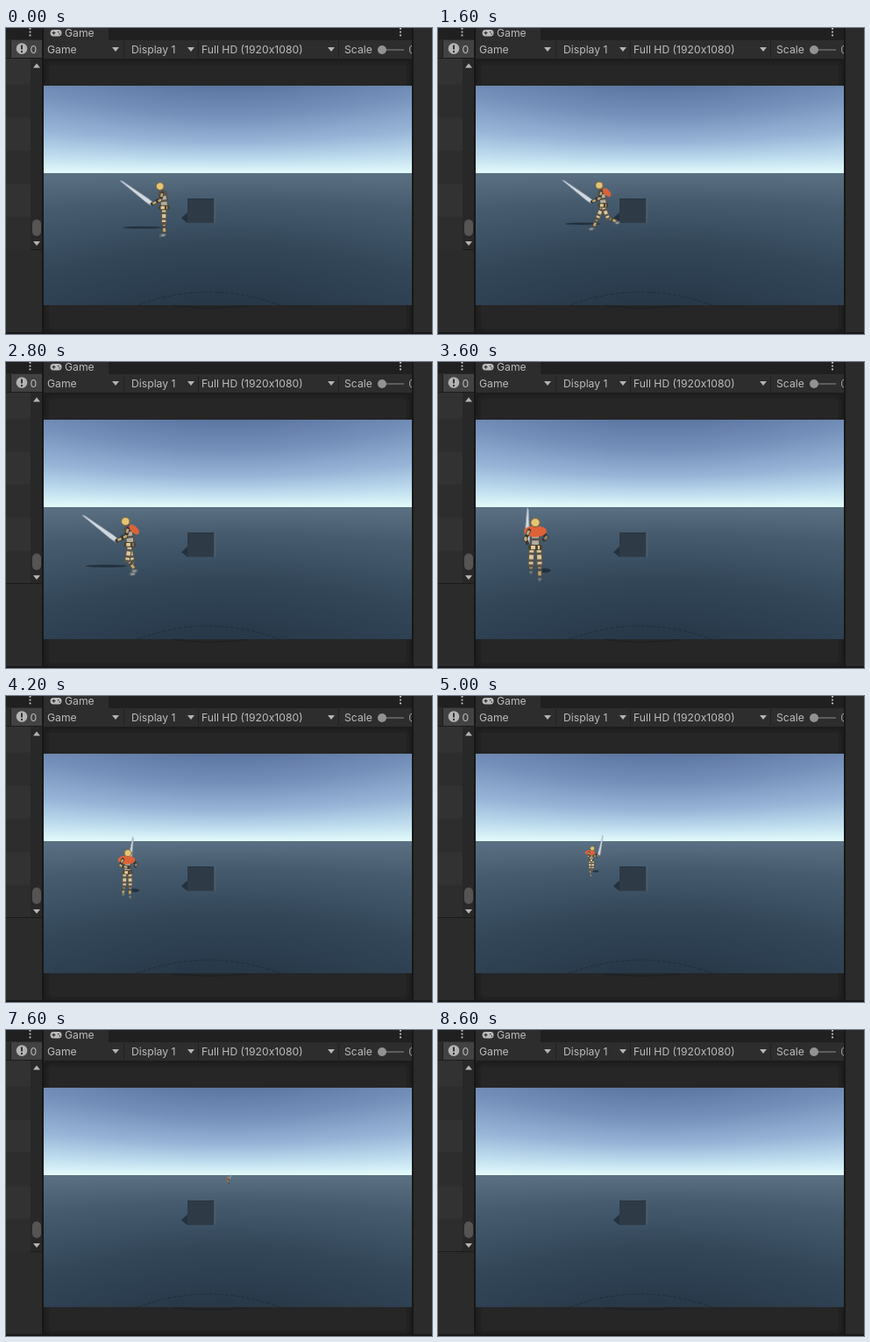
These frames come from a looping animation (486x350 px, 9.6 s). An HTML page:

```html
<!DOCTYPE html>
<html lang="en">
<head>
<meta charset="utf-8">
<title>Game view</title>
<style>
  html, body { margin: 0; width: 100%; height: 100%; overflow: hidden; background: #202020; }
  svg { display: block; width: 486px; height: 350px; }
  text { font: 12.2px Inter, "Open Sans", sans-serif; fill: #bcbcbc; }
</style>
</head>
<body>
<svg viewBox="0 0 486 350">
  <defs>
    <linearGradient id="sky" gradientUnits="userSpaceOnUse" x1="0" x2="0" y1="-100" y2="0">
      <stop stop-color="#5c76a2"/>
      <stop offset=".35" stop-color="#7590ba"/>
      <stop offset=".65" stop-color="#98b5d8"/>
      <stop offset=".86" stop-color="#c0deef"/>
      <stop offset="1" stop-color="#e4fbfb"/>
    </linearGradient>
    <linearGradient id="ground" gradientUnits="userSpaceOnUse" x1="0" x2="0" y1="0" y2="151">
      <stop stop-color="#5b7183"/>
      <stop offset=".2" stop-color="#465c6e"/>
      <stop offset=".55" stop-color="#324658"/>
      <stop offset="1" stop-color="#273848"/>
    </linearGradient>
    <clipPath id="view"><rect x="43" y="66" width="420" height="251"/></clipPath>
  </defs>

  <rect width="486" height="350" fill="#2b2b2b"/>

  <!-- list panel -->
  <rect width="41" height="13" fill="#202020"/>
  <rect x="6" y="14" width="35" height="20" fill="#424242"/>
  <path d="M5.5 14V34M0 34.5H41" stroke="#1c1c1c"/>
  <circle cx="18" cy="23.5" r="6.3" fill="#b4b4b4"/>
  <path d="M18 19.5V24.5M18 26V28" stroke="#333" stroke-width="2"/>
  <text x="27.5" y="29">0</text>
  <g id="rows"></g>
  <rect x="28" y="35" width="13" height="218" fill="#282828"/>
  <path d="M31 45.5h8l-4-5zM31 244h8l-4 5z" fill="#b4b4b4"/>
  <rect x="30" y="219" width="10" height="19" rx="5" fill="#555"/>
  <path d="M28 253.5H41" stroke="#1a1a1a"/>
  <path id="rule" d="M0 253.5H28" stroke="#1a1a1a"/>

  <!-- game panel -->
  <rect x="41" width="424" height="14" fill="#202020"/>
  <rect x="43" width="74" height="14" fill="#2d2d2d"/>
  <rect x="43" y="14" width="420" height="21" fill="#2d2d2d"/>
  <rect x="43" y="35" width="420" height="313" fill="#1d1d1d"/>
  <rect x="47" y="40" width="412" height="306" rx="6" fill="#262626" stroke="#212121" stroke-width="4"/>
  <path d="M42 0V349M464 0V349M0 349H486" stroke="#171717" stroke-width="2"/>
  <path d="M134.5 15V34M219.5 15V34M379.5 15V34" stroke="#202020"/>
  <rect x="50.5" y="2" width="13" height="7.5" rx="3.7" fill="#bcbcbc"/>
  <path d="M52.5 5.7h4M54.5 3.7v4M59 4.7h1.4M60.5 6.8h1.4" stroke="#333" stroke-width="1.2"/>
  <g id="dots" fill="#bcbcbc"></g>
  <text x="67" y="10">Game</text>
  <text x="47" y="29">Game</text>
  <text x="143" y="29">Display 1</text>
  <text x="223" y="29">Full HD (1920x1080)</text>
  <text x="386" y="29">Scale</text>
  <path d="M121 22h8l-4 5zM207 22h8l-4 5zM367 22h8l-4 5z" fill="#b4b4b4"/>
  <path d="M429 25H454" stroke="#5c5c5c" stroke-width="2"/>
  <circle cx="429" cy="25" r="5" fill="#929292"/>
  <path d="M463 20.3q-2.4 0-2.4 4.3t2.4 4.3" fill="none" stroke="#b4b4b4"/>

  <!-- scene -->
  <g clip-path="url(#view)">
    <g id="backdrop" shape-rendering="crispEdges"></g>
    <path d="M150 317Q232 287 312 317" fill="none" stroke="#202d3a" stroke-dasharray="4 2"/>
    <path d="M200 217.5L207 211V223z" fill="#24313e"/>
    <rect x="207" y="195" width="31" height="28" fill="#2e3a46"/>
    <path d="M207 195.5H238" stroke="#26333f"/>
    <path d="M238 195V223" stroke="#5b6b78"/>
    <g id="hero" stroke-linecap="round" stroke-linejoin="round"></g>
  </g>
  <path d="M190 317.5Q232 323 275 317.5" fill="none" stroke="#1b1f24"/>
</svg>

<script>
const LOOP = 9600, STEP = 200, LAST_STEP = 8600;
const HORIZON = 166, CENTER = 253, FOCAL = 217;
const $ = id => document.getElementById(id);

function set(node, attrs) {
  for (const name in attrs) node.setAttribute(name, attrs[name]);
}
function add(parent, tag, attrs) {
  const node = document.createElementNS("http://www.w3.org/2000/svg", tag);
  set(node, attrs);
  return parent.appendChild(node);
}

for (const x of [27.5, 450])
  for (const y of [0.8, 4.6, 8.4]) add($("dots"), "circle", { cx: x, cy: y, r: 1.1 });

const rows = Array.from({ length: 6 }, (_, i) =>
  add($("rows"), "rect", { y: Math.max(35, 27 + i * 37.8), width: 28, height: i ? 37.8 : 30 }));

// Lines of equal elevation bend away from the horizon towards the sides of a wide view.
for (let x = 43; x < 463; x += 5) {
  const stretch = Math.hypot(1, (x + 2.5 - CENTER) / FOCAL);
  const strip = { width: 5, height: 151, transform: `translate(${x} ${HORIZON}) scale(1 ${stretch})` };
  add($("backdrop"), "rect", { ...strip, y: -151, fill: "url(#sky)" });
  add($("backdrop"), "rect", { ...strip, y: 0, fill: "url(#ground)" });
}

// time, foot x, foot y
const ROUTE = [
  [0, 180, 238], [1200, 180, 238], [1600, 188, 233], [2200, 202, 233], [2800, 141, 244],
  [3600, 111, 250], [5000, 175, 206], [6600, 228, 190], [8400, 273, 167]
];

function footAt(t) {
  const next = Math.max(1, ROUTE.findIndex(p => p[0] >= t));
  const a = ROUTE[next - 1], b = ROUTE[next];
  const u = (t - a[0]) / (b[0] - a[0]);
  return [a[1] + (b[1] - a[1]) * u, a[2] + (b[2] - a[2]) * u];
}
function ease(t, from, to) {
  const u = Math.min(1, Math.max(0, (t - from) / (to - from)));
  return u * u * (3 - 2 * u);
}

const hero = $("hero");
// a dark limb with plates of armour along it
const limb = (base, plate) =>
  [base, plate].map(stroke => add(hero, "path", { fill: "none", stroke }));
const shadow = add(hero, "ellipse", { fill: "#1d2934", opacity: 0.8 });
const blade = add(hero, "path", { fill: "#d2d8e0", stroke: "#8f9baa" });
const farArm = limb("#34332f", "#8d8069");
const legs = [0, 1].map(() => ({
  shin: limb("#454a50", "#c3a45c"),
  foot: limb("#59636c", "#8b959d"),
  thigh: limb("#5b5449", "#d9c79d")
}));
const torso = limb("#55534f", "#b3ab9c");
const belt = limb("#4a4234", "#e0cb94");
const cape = add(hero, "ellipse", { fill: "#de6238" });
const nearArm = limb("#3b3935", "#c2a871");
const head = add(hero, "ellipse", { fill: "#e4c575", stroke: "#7a6238" });

function drawHero(t) {
  const visible = t < 8400;
  hero.style.display = visible ? "" : "none";
  if (!visible) return;

  const [x, y] = footAt(t);
  const h = (y - HORIZON) * 0.85;
  const run = ease(t, 1200, 1500), away = ease(t, 2800, 3600), right = ease(t, 3600, 5000);
  const turn = (5 + 85 * away + 30 * right) * Math.PI / 180;
  const forward = -Math.cos(turn), side = Math.sin(turn), left = Math.max(0, -forward);

  // forward, sideways and upward body units to screen
  const at = (f, s, up) => [x + h * (f * forward + s * side), y - h * up];
  const path = points => "M" + points.map(p => p.map(v => v.toFixed(2))).join("L");
  const line = ([base, plate], width, ...points) => {
    const d = path(points);
    set(base, { d, "stroke-width": width * h });
    set(plate, {
      d, "stroke-width": width * h * 0.65, "stroke-linecap": "butt",
      "stroke-dasharray": `${h * 0.07} ${h * 0.04}`
    });
  };

  const phase = (0.8 + (t - 1600) / 280) * Math.PI;
  const stride = 0.06 + 0.64 * run;
  legs.forEach((leg, i) => {
    const p = phase + i * Math.PI, s = i ? 0.07 : -0.07;
    const thigh = stride * Math.sin(p);
    const shin = thigh - 1.3 * stride * Math.max(0, Math.cos(p));
    const kneeF = 0.24 * Math.sin(thigh), kneeUp = 0.5 - 0.24 * Math.cos(thigh);
    const footF = kneeF + 0.24 * Math.sin(shin), footUp = kneeUp - 0.24 * Math.cos(shin);
    const knee = at(kneeF, s, kneeUp), foot = at(footF, s, footUp);
    line(leg.thigh, 0.105, at(0, s * 0.8, 0.52), knee);
    line(leg.shin, 0.075, knee, foot);
    line(leg.foot, 0.06, foot, at(footF + 0.06, s, footUp - 0.01));
  });

  line(torso, 0.17, at(-0.01, 0, 0.57), at(0.02, 0, 0.79));
  line(belt, 0.09, at(0.05, -0.07, 0.53), at(-0.06, 0.07, 0.53));

  const grip = [0.22, -0.13 * away + 0.29 * right, 0.6 + 0.08 * right];
  const hand = at(...grip);
  line(farArm, 0.065, at(0.02, 0.1, 0.8), at(0.06, 0.18, 0.69), at(0.14, 0.14, 0.66));
  line(nearArm, 0.065, at(0.02, -0.1, 0.8), at(0.05, -0.16, 0.67), hand);

  const tilt = (36 + 14 * away + 20 * right) * Math.PI / 180;
  const tip = at(grip[0] + 0.74 * Math.cos(tilt), grip[1], grip[2] + 0.74 * Math.sin(tilt));
  const dx = tip[0] - hand[0], dy = tip[1] - hand[1], length = Math.hypot(dx, dy);
  const edge = (u, w) =>
    [hand[0] + dx * u - dy / length * h * w, hand[1] + dy * u + dx / length * h * w];
  set(blade, {
    d: path([edge(0, 0.035), edge(0.15, 0.04), edge(0.95, 0.02), tip, edge(0.15, -0.04), edge(0, -0.035)]) + "Z",
    "stroke-width": h * 0.012
  });

  const [cx, cy] = at(-0.08, 0, 0.79);
  set(cape, {
    cx, cy, rx: h * (0.1 + 0.08 * side), ry: h * (0.055 + 0.035 * side),
    transform: `rotate(${45 * left} ${cx} ${cy})`, opacity: run
  });

  const [hx, hy] = at(0.07, 0, 0.93);
  set(head, { cx: hx, cy: hy, rx: h * 0.073, ry: h * 0.07, "stroke-width": h * 0.015 });
  set(shadow, {
    cx: x + h * (0.15 - 0.55 * left), cy: y - h * 0.16,
    rx: h * (0.1 + 0.26 * left), ry: h * (0.035 - 0.012 * left)
  });
}

function render(time) {
  const t = Math.min(LAST_STEP, Math.floor(time % LOOP / STEP) * STEP);
  const lightRow = t >= 5200 && t < 7400 ? 1 : 0;
  rows.forEach((row, i) => set(row, { fill: i % 2 === lightRow ? "#323232" : "#2d2d2d" }));
  $("rule").style.opacity = t >= 2600 && t < 6200 || t >= 8600 ? 1 : 0;
  drawHero(t);
}

const start = performance.now();
function tick() {
  render(performance.now() - start);
  requestAnimationFrame(tick);
}
tick();
</script>
</body>
</html>
```
